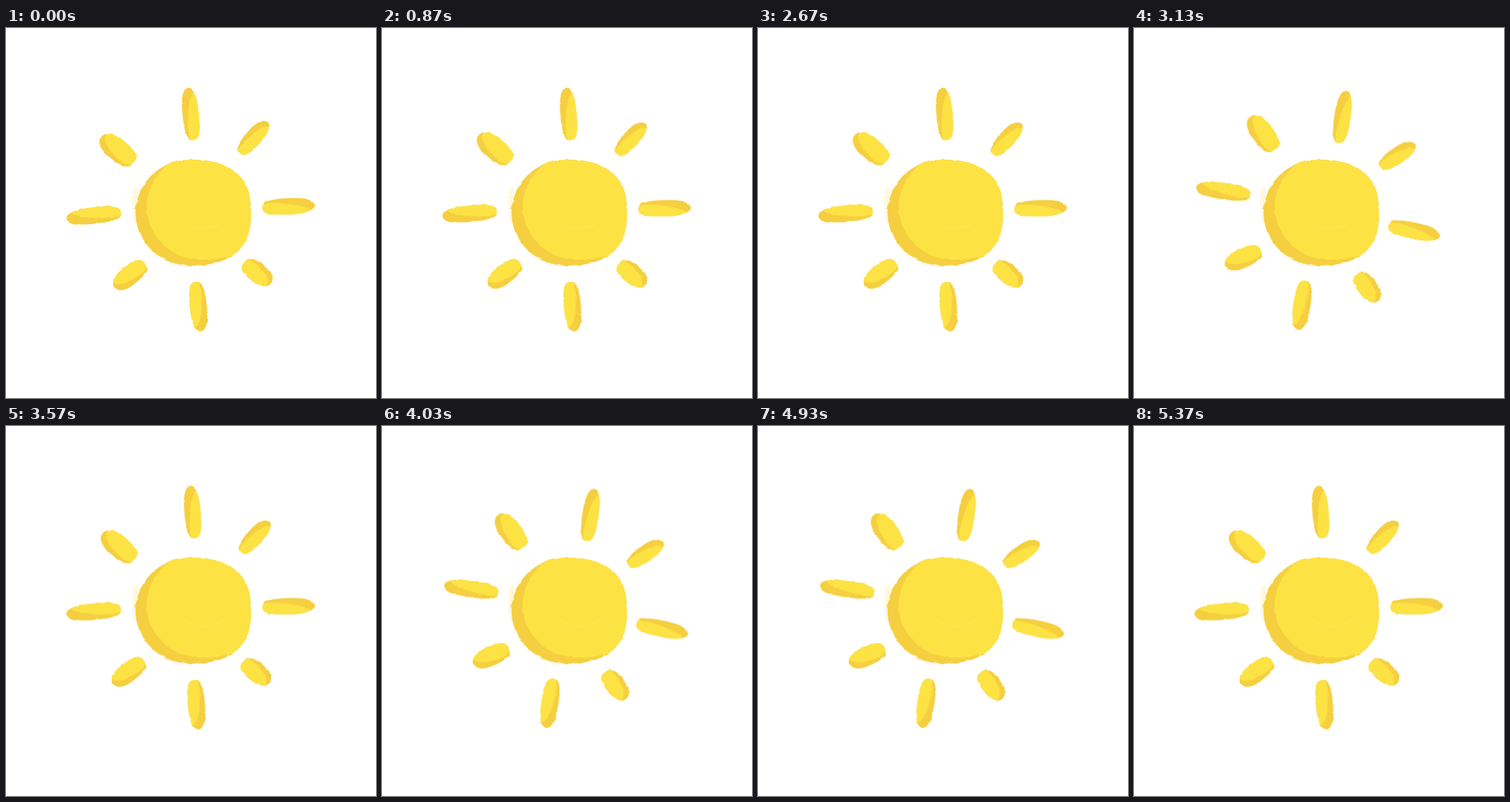
Animation, 500 px wide and 500 px high, one loop 5.41 s. Source, as an HTML page:

```html
<!DOCTYPE html>
<html lang="en">
<head>
<meta charset="utf-8">
<title>Sun</title>
<style>
  html, body { margin: 0; width: 100%; height: 100%; overflow: hidden; background: #fff; }
  svg { display: block; width: 100vw; height: 100vh; }
</style>
</head>
<body>
<svg viewBox="0 0 500 500">
  <defs>
    <filter id="rough" filterUnits="userSpaceOnUse" x="0" y="0" width="500" height="500" color-interpolation-filters="sRGB">
      <feTurbulence type="fractalNoise" baseFrequency=".13" numOctaves="2" seed="4"/>
      <feDisplacementMap in="SourceGraphic" scale="3" xChannelSelector="R" yChannelSelector="G"/>
    </filter>
  </defs>
  <g id="swing"><g id="rays" filter="url(#rough)"></g></g>
  <path d="M176 217Q171 240 177 266M212 311Q225 318 242 320" fill="none" stroke="#f9dc70" stroke-width="6" stroke-dasharray="1 1.6" opacity=".5"/>
  <g id="disc" filter="url(#rough)"></g>
  <path d="M241 262Q269 282 297 258" fill="none" stroke="#fee65e" stroke-width="2" opacity=".6"/>
</svg>
<script>
const LIGHT = '#fde244', SHADE = '#f5cf40';
const el = id => document.getElementById(id);
let count = 0;

// Superellipse, squarer on the right for positive skew, on the left for negative
function outline(a, b, roundness, skew) {
  const points = [];
  for (let deg = 0; deg < 360; deg += 5) {
    const t = deg * Math.PI / 180, c = Math.cos(t), s = Math.sin(t);
    const power = roundness - skew * c;
    const bend = v => Math.sign(v) * Math.abs(v) ** power;
    points.push([(a * bend(c)).toFixed(2), (b * bend(s)).toFixed(2)]);
  }
  return 'M' + points.join('L') + 'Z';
}

// Dark shape covered by a moved light copy, which leaves a shaded rim
function blob(parent, place, d, move) {
  const id = 'clip' + count++;
  parent.insertAdjacentHTML('beforeend',
    `<g transform="${place}">
       <clipPath id="${id}"><path d="${d}"/></clipPath>
       <path d="${d}" fill="${SHADE}"/>
       <g clip-path="url(#${id})"><path d="${d}" fill="${LIGHT}" transform="${move}"/></g>
     </g>`);
}

// Each ray points outwards and is shaded on the anticlockwise side of its tip
function ray(x, y, angle, a, b) {
  blob(el('rays'), `translate(${x} ${y}) rotate(${angle})`, outline(a, b, .8, -.12),
    `translate(-2 2) rotate(9 ${-a} 0)`);
}

ray(249.5, 116, -96, 35.5, 11);
ray(335, 147.5, -49, 28, 11);
ray(382, 241, -3, 35.5, 11);
ray(340, 331, 38, 23, 13);
ray(260, 376.5, 84, 33.5, 11.5);
ray(167, 334.5, 141, 26, 13);
ray(118.5, 253.5, 174, 37, 11);
ray(150.5, 164.5, 218, 28, 14.5);

blob(el('disc'), 'translate(253 249.5)', outline(78, 71.5, .9, .1), 'translate(15 -8)');

const FPS = 30, LOOP = 5410, SWING = 27, REACH = 15;

// Linear swing to 15 degrees clockwise and back, on 30 frames a second
function draw(now) {
  const frame = Math.min(161, Math.floor((now % LOOP + 4) * FPS / 1000));
  const phase = frame % SWING / SWING;
  const angle = REACH * (1 - Math.abs(1 - 2 * phase));
  el('swing').setAttribute('transform', `rotate(${angle} 250 245)`);
  requestAnimationFrame(draw);
}
draw(performance.now());
</script>
</body>
</html>
```
